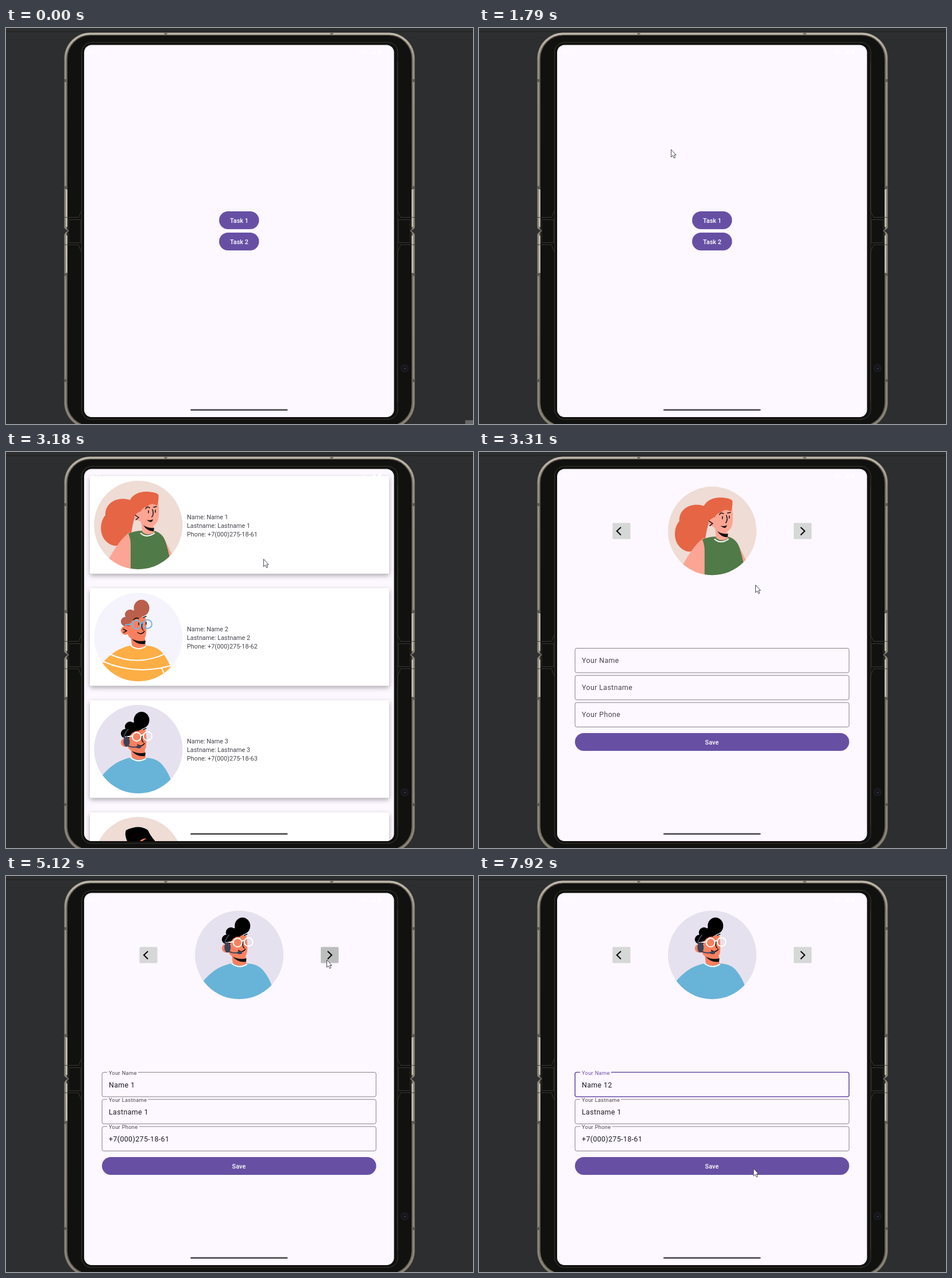
Recreate the animation shown at these times as an HTML page. Size 813x689 px, loop 8 s.

```html
<!DOCTYPE html>
<html lang="en">
<head>
<meta charset="utf-8">
<title>Contact editor</title>
<style>
  html, body { margin: 0; width: 100%; height: 100%; overflow: hidden; background: #2d2e30; }
  svg { display: block; width: 100%; height: 100%; font-family: Roboto, sans-serif; }
  .btn { fill: #6750a4; }
  .btnText { fill: #fff; font-size: 10.85px; font-weight: 500; letter-spacing: .08px; text-anchor: middle; }
  .cardText { fill: #46444a; font-size: 10.85px; }
  .value { fill: #1d1b20; font-size: 12.4px; letter-spacing: .39px; }
  .line { fill: none; stroke: #111; stroke-width: 1.5; stroke-linecap: round; }
  .seam { fill: none; stroke: #3b3b39; stroke-width: .9; }
  .chevron { fill: none; stroke: #000; stroke-width: 2; }
</style>
</head>
<body>
<svg viewBox="0 0 813 689">
  <defs>
    <clipPath id="screen"><rect x="136" y="29.5" width="539.5" height="647.5" rx="13"/></clipPath>
    <clipPath id="round"><circle cx="230.3" cy="127" r="77"/></clipPath>
    <filter id="shadow" x="-5%" y="-12%" width="110%" height="135%">
      <feDropShadow dx="0" dy="3.5" stdDeviation="4.5" flood-color="#000" flood-opacity=".32"/>
    </filter>
    <linearGradient id="metal" x1="0" y1="0" x2="0" y2="1">
      <stop offset="0" stop-color="#c4bdb0"/><stop offset=".07" stop-color="#968f82"/><stop offset="1" stop-color="#8b8477"/>
    </linearGradient>

    <path id="torso" d="M160 182Q182 153 203 146Q216 141 218 142H243Q262 142 272 154Q283 167 289 186L270 210H190Z"/>
    <g id="curlHead">
      <path d="M217 124L219 141Q230 150 243 142L241 122Z" fill="#f9805f"/>
      <path d="M209 101Q225 88 243 94Q246 116 243 126Q238 134 226 132Q214 130 212 122Z" fill="#f9805f"/>
      <circle cx="207.500" cy="115.500" r="7.500" fill="#f9805f"/>
      <g fill="currentColor">
        <ellipse cx="236" cy="76.500" rx="13.500" ry="14.500"/>
        <circle cx="216" cy="88" r="9"/><circle cx="208" cy="100" r="8"/>
        <path d="M210 88L226 78L241 89Q234 95 224 96Q217 99 214 109L203 105Z"/>
      </g>
      <path d="M219 130Q230 136 243 133L242 139Q228 141 219 130Z" fill="#111"/>
      <path class="line" d="M222 97Q226 92 231 95M239 93L244 91M237 103Q235 112 239 115M229 119Q236 124 241 117"/>
      <path d="M217 142Q230 152 244 143" fill="none" stroke="#fff" stroke-width="2"/>
    </g>
    <g id="glasses" fill="none" stroke-width="2">
      <circle cx="227.500" cy="105.500" r="7.500"/><circle cx="246.500" cy="104.500" r="7.500"/>
      <path d="M235 104Q237 101 239 103M220 104L207 106"/>
    </g>

    <g id="avatar1" clip-path="url(#round)">
      <path d="M150 40h160v170H150Z" fill="#eedcd5"/>
      <path d="M222 86C202 75 172 84 173 110C161 123 161 156 188 163C206 164 217 150 219 136Q222 115 230 100Z" fill="#e66545"/>
      <path d="M216 139C200 150 188 170 178 188L220 210ZM276 152L292 184L280 192Z" fill="#fca594"/>
      <path d="M213 142Q225 137 236 137H258Q273 141 278 157Q282 169 285 184V206H217V162Q217 150 213 142Z" fill="#507a48"/>
      <path d="M235 116L237 139Q246 147 258 140L256 122Z" fill="#fca594"/>
      <path d="M227 98Q246 86 265 87Q268 109 264 120Q258 132 246 129Q236 127 233 120Q223 119 223 110Z" fill="#fca594"/>
      <path d="M214 92C214 77 230 68 246 69Q263 70 265.500 75Q266 86 263 93Q252 87 246 95Q238 96 235 103Q228 105 224 111L217 112Z" fill="#e66545"/>
      <path d="M239 127Q246 133 258 132L257 138Q245 138 239 127ZM245 118Q251 120 256 117Q254 126 245 118Z" fill="#111"/>
      <path class="line" d="M243 99Q245 94 250 97M257 96L262 95M248 102V106M260 101V105M255 100Q258 108 254 113M225 110L231 114L226 118"/>
      <path d="M234 141Q245 151 259 141" fill="none" stroke="#fff" stroke-width="2"/>
    </g>
    <g id="avatar2" clip-path="url(#round)">
      <path d="M150 40h160v170H150Z" fill="#f5f4fd"/>
      <use href="#torso" fill="#fdae45"/>
      <path d="M179 156Q228 179 277 156M168 169Q225 194 286 177M271 181L275 190" fill="none" stroke="#fff" stroke-width="2"/>
      <use href="#curlHead" color="#b95f4c"/>
      <path class="line" d="M204 113L210 116L205 119M231 102V106M244 101V105"/>
      <use href="#glasses" stroke="#76b6de"/>
    </g>
    <g id="avatar3" clip-path="url(#round)">
      <path d="M150 40h160v170H150Z" fill="#e6e1ee"/>
      <use href="#torso" fill="#68b4d8"/>
      <use href="#curlHead" color="#000"/>
      <use href="#glasses" stroke="#fff"/>
      <g fill="#3a4258"><ellipse cx="210" cy="114" rx="5.500" ry="9"/><ellipse cx="231" cy="123" rx="4.500" ry="2.600"/></g>
      <path d="M211 120Q218 125 230 123M205 107Q207 98 213 92" fill="none" stroke="#3a4258" stroke-width="2"/>
    </g>
    <g id="avatar4" clip-path="url(#round)">
      <path d="M150 40h160v170H150Z" fill="#eedcd5"/>
      <path d="M214 98Q205 82 209 73Q232 62 247 73Q252 84 259 91V100Z"/>
      <path d="M231 94Q238 86 245 88Q236 90 234 100Z" fill="#f9805f"/>
    </g>

    <g id="side">
      <path d="M101.500 56V650" stroke="#5e5a52"/>
      <path d="M105.700 281V346M105.700 361V426" stroke="#cdc8bd" stroke-width="2.200"/>
      <path d="M101 91.500h4M101 277.500h4M101 429h4M101 613.500h4" stroke="#5a564f" stroke-width="5"/>
      <path d="M99 342Q101 350 108 352.500Q102 356 99 364Z" fill="#2d2e30"/>
      <path d="M102 345Q104 350 109 352.800Q104 356 102 361" fill="none" stroke="#8d877b" stroke-width="1.200"/>
      <path class="seam" d="M131.500 60V318L126 329.500H101M101 377H126L131.500 390V650M109 333.500H130V373.500H109Z"/>
    </g>
  </defs>

  <path d="M0 0H813V689H0Z" fill="#2d2e30"/>
  <path d="M0 6.500H813" stroke="#1d1e20"/>
  <path id="corner" d="M799.500 682.500H813V689H799.500Z" fill="#67686a"/>

  <rect x="101" y="7.500" width="611" height="690" rx="46" fill="#5e5a52"/>
  <rect x="103.500" y="10" width="606" height="685" rx="43.500" fill="none" stroke="url(#metal)" stroke-width="3.200"/>
  <path d="M278 8v4M567 8v4" stroke="#77736a" stroke-width="5"/>
  <rect x="107" y="13" width="599" height="679" rx="40" fill="#11110f"/>
  <rect x="131.500" y="25" width="550.500" height="656" rx="17" fill="none" stroke="#3a3a37"/>
  <use href="#side"/>
  <use href="#side" transform="matrix(-1 0 0 1 813 0)"/>
  <circle cx="694" cy="592" r="7.500" fill="#1a1a1d"/>
  <circle cx="694" cy="592" r="4" fill="#15151f"/>
  <circle cx="694.500" cy="592.500" r="1" fill="#55547e"/>

  <g clip-path="url(#screen)">
    <path d="M136 29H676V678H136Z" fill="#fdf7ff"/>
    <g id="menu"></g>
    <g id="list"></g>
    <g id="form">
      <use id="photo" href="#avatar1" x="175.700" y="10.300"/>
      <rect x="232.500" y="123.500" width="31" height="28" rx="1.500" fill="#d6d7d7"/>
      <rect id="next" x="548" y="123.500" width="31" height="28" rx="1.500"/>
      <path class="chevron" d="M247 131L240 137.500L247 144.500M560 131L567 137.500L560 144.500"/>
      <g id="fields"></g>
      <rect class="btn" x="167" y="489" width="477.500" height="31" rx="15.500"/>
      <text class="btnText" x="405.500" y="509">Save</text>
      <path id="caret" d="M224 354V372" stroke="#6750a4" stroke-width="1.600"/>
      <path id="handle" d="M224 371L229.500 376.700A7.700 7.700 0 1 1 218.500 376.700Z" fill="#6750a4"/>
    </g>
    <g fill="#fff" font-size="10">
      <text x="147" y="45">9:11</text><text x="617" y="45">3G</text>
      <path d="M635 45L643 37V45ZM648 37h5v8h-5Z"/>
    </g>
    <rect x="321" y="663" width="169.500" height="3" rx="1.500" fill="#5d5c5f"/>
  </g>
  <path id="mouse" d="M.5.500V13.500L3.400 10.800L5.600 15.400L7.700 14.400L5.600 10H9.200Z" fill="#fff" stroke="#35343f" stroke-width=".9"/>
</svg>
<script>
const $ = id => document.getElementById(id);
const show = (id, on) => $(id).style.display = on ? '' : 'none';
const between = (t, a, b) => t >= a && t < b;
const ramp = (t, a, b) => {
  const p = Math.min(1, Math.max(0, (t - a) / (b - a)));
  return p * p * (3 - 2 * p);
};
const mix = (a, b, p) => a + (b - a) * p;

const LOOP = 8000, LIST = 2400, FORM = 3200, FILL = 3640, FOCUS = 6100, TYPE = 7400;
const phone = n => `+7(000)275-18-6${n}`;

$('menu').innerHTML = [1, 2].map(n => {
  const y = 282 + 37 * n;
  return `<rect class="btn" x="371" y="${y}" width="69.500" height="31" rx="15.500"/>
    <text class="btnText" x="406" y="${y + 20}">Task ${n}</text>`;
}).join('');

$('list').innerHTML = [1, 2, 3, 4].map(n => {
  const lines = [`Name: Name ${n}`, `Lastname: Lastname ${n}`, `Phone: ${phone(n)}`];
  return `<g transform="translate(0 ${195 * (n - 1)})">
    <rect x="146" y="42" width="521" height="169.500" rx="3" fill="#fff" filter="url(#shadow)"/>
    <use href="#avatar${n}"/>
    ${lines.map((s, i) => `<text class="cardText" x="315" y="${116.5 + 15 * i}">${s}</text>`).join('')}
  </g>`;
}).join('');

// label, value, right end of the gap in the outline
const fields = [['Your Name', 'Name 1', 230], ['Your Lastname', 'Lastname 1', 247], ['Your Phone', phone(1), 232]];
$('fields').innerHTML = fields.map(([label, value], i) => `<g transform="translate(0 ${47.2 * i})">
    <rect id="box${i}" x="167.200" y="341.500" width="477" height="42.500" rx="3" fill="none"/>
    <rect id="gap${i}" x="176" y="340" height="3.500" fill="#fdf7ff"/>
    <text id="label${i}" x="179">${label}</text>
    <text id="value${i}" class="value" x="179" y="368">${value}</text>
  </g>`).join('');

// time, x, y of the pointer
const path = [
  [70, 815, 692], [480, 398, 364], [720, 461, 431], [800, 461, 431], [1250, 335, 217],
  [1650, 396, 358], [1790, 334, 211], [2060, 334, 211], [2300, 385, 340], [2520, 369.5, 350.5],
  [2920, 405, 215], [3130, 440, 175], [3310, 481, 231], [3740, 490, 228], [4390, 529, 162],
  [4590, 574, 141], [4720, 574, 141], [5000, 558, 145.5], [5220, 558, 145.5], [5520, 455, 320],
  [5780, 397, 372], [7180, 397, 372], [7580, 472, 536], [7920, 477.5, 508.5]
];
function pointer(t) {
  const i = path.findIndex(k => k[0] > t);
  if (i < 0) return path[path.length - 1].slice(1);
  if (i === 0) return [840, 710];
  const a = path[i - 1], b = path[i], p = ramp(t, a[0], b[0]);
  return [mix(a[1], b[1], p), mix(a[2], b[2], p)];
}

function drawFields(t) {
  const up = ramp(t, FILL, FILL + 190), focus = ramp(t, FOCUS, FOCUS + 200);
  fields.forEach(([, value, gapEnd], i) => {
    const on = i === 0 ? focus : 0, size = mix(12.4, 9.3, up);
    $('box' + i).setAttribute('stroke', on > 0 ? '#6750a4' : '#79747e');
    $('box' + i).setAttribute('stroke-width', mix(.9, 1.6, on));
    $('gap' + i).setAttribute('width', (gapEnd - 176) * up);
    const label = $('label' + i);
    label.setAttribute('y', mix(367, 345.6, up));
    label.style.cssText = `font-size:${size}px;letter-spacing:${size * .032}px;fill:${on > 0 ? '#6750a4' : '#49454f'}`;
    $('value' + i).setAttribute('opacity', up);
    $('value' + i).textContent = value + (i === 0 && t >= TYPE ? '2' : '');
  });
}

function draw(t) {
  show('corner', t < 70);
  show('menu', t < LIST);
  show('list', between(t, LIST, FORM));
  show('form', t >= FORM);
  $('photo').setAttribute('href', '#avatar' + (t < 4800 ? 1 : t < 5060 ? 2 : 3));
  const pressed = between(t, 4730, 4880) || between(t, 5020, 5200);
  $('next').setAttribute('fill', pressed ? '#bcbebd' : '#d6d7d7');
  drawFields(t);
  show('caret', between(t, 6250, 6770) || between(t, 7240, TYPE + 500));
  $('caret').setAttribute('transform', `translate(${t < TYPE ? 0 : 8} 0)`);
  show('handle', between(t, 6510, TYPE));
  $('mouse').setAttribute('transform', `translate(${pointer(t)})`);
}

const start = performance.now();
function tick() {
  draw((performance.now() - start) % LOOP);
  requestAnimationFrame(tick);
}
tick();
</script>
</body>
</html>
```
